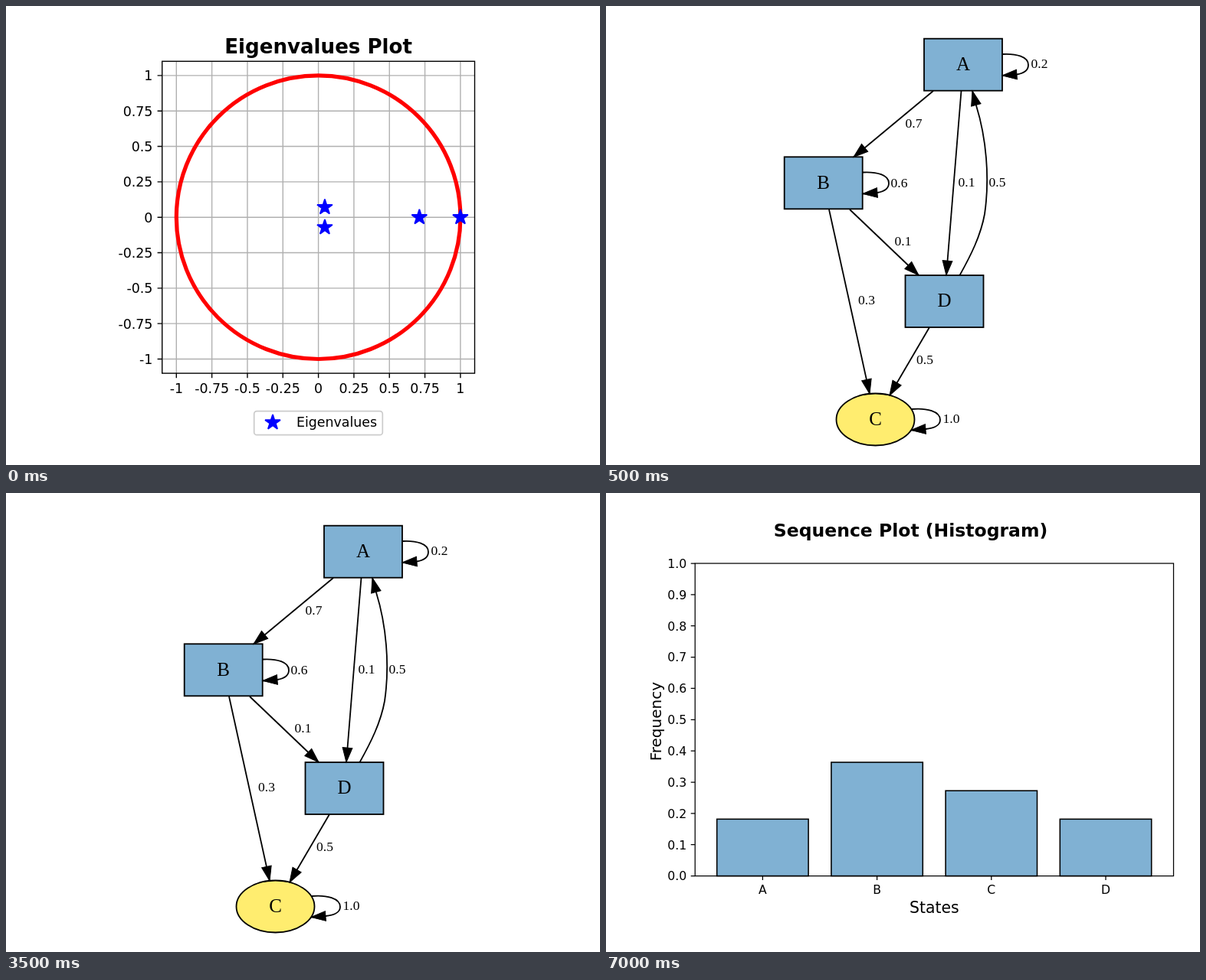
An HTML page that plays this animation: 775x600 px, repeating every 8000 ms.

```html
<!DOCTYPE html>
<html lang="en">
<head>
<meta charset="utf-8">
<title>Markov chain plots</title>
<style>
  html, body { margin: 0; width: 100%; height: 100%; overflow: hidden; background: #fff; }
  svg { display: block; }
  text { text-anchor: middle; }
  .plot { font-family: "DejaVu Sans", sans-serif; }
  .graph { font-family: "Liberation Serif", serif; font-size: 17.5px; }
  .graph .node { font-size: 25px; }
  .title { font-weight: bold; }
  .end { text-anchor: end; }
  .line { fill: none; stroke: #000; }
</style>
</head>
<body>
<svg id="stage" width="775" height="600" viewBox="0 0 775 600">
  <defs>
    <marker id="arrow" markerUnits="userSpaceOnUse" markerWidth="24" markerHeight="18"
            refX="20" refY="9" orient="auto">
      <path d="M1 2.6L20 9L1 15.4Z" stroke="#000"/>
    </marker>
  </defs>
</svg>
<script>
const BLUE = '#80b1d3', YELLOW = '#ffed6f';
const stage = document.getElementById('stage');

const text = (x, y, label, attrs = '') => `<text x="${x}" y="${y}" ${attrs}>${label}</text>`;
const path = (d, attrs = '') => `<path class="line" d="${d}" ${attrs}/>`;
const rect = (x, y, w, h, attrs) => `<rect x="${x}" y="${y}" width="${w}" height="${h}" ${attrs}/>`;
const range = n => [...Array(n).keys()];

function star(cx, cy) {
  const points = range(10).map(i => {
    const r = i % 2 ? 3.98 : 10.43, a = i * Math.PI / 5;
    return `${cx + r * Math.sin(a)},${cy - r * Math.cos(a)}`;
  });
  return `<polygon points="${points.join(' ')}" fill="#00f" stroke="#00f" stroke-width="1.74" stroke-linejoin="bevel"/>`;
}

function eigenvaluePlot() {
  const left = 203.7, top = 72.3, size = 407.8, bottom = top + size;
  const cx = left + size / 2, cy = top + size / 2, unit = 185.3;
  let grid = '', ticks = '', labels = '';
  for (let v = -1; v <= 1; v += 0.25) {
    const x = cx + v * unit, y = cy - v * unit;
    grid += `M${x} ${top}v${size}M${left} ${y}h${size}`;
    ticks += `M${x} ${bottom}v6.1M${left} ${y}h-6.1`;
    labels += text(x, 505.6, v) + text(191.4, y + 6.4, v, 'class="end"');
  }
  const values = [[0.045, 0.071], [0.045, -0.071], [0.711, 0], [1, 0]];
  return `<g class="plot" font-size="17.4">`
    + path(grid, 'style="stroke:#b0b0b0" stroke-width="1.39"')
    + `<circle cx="${cx}" cy="${cy}" r="${unit}" fill="none" stroke="red" stroke-width="5.2"/>`
    + values.map(([re, im]) => star(cx + re * unit, cy - im * unit)).join('')
    + path(ticks, 'stroke-width="1.39"')
    + rect(left, top, size, size, 'class="line" stroke-width="1.39"')
    + labels
    + text(cx, 61.5, 'Eigenvalues Plot', 'class="title" font-size="26.1"')
    + rect(323.7, 529.7, 167.6, 31, 'rx="3.5" fill="#fff" stroke="#ccc" stroke-width="1.74"')
    + star(348, 544.4)
    + text(431.5, 550.2, 'Eigenvalues')
    + '</g>';
}

function transitionGraph() {
  const boxes = [['A', 466, 76.7], ['B', 283.7, 231.3], ['D', 441.5, 386]];
  const edges = [
    ['M427 111L323 197.5', 0.7, 401.5, 158.5],
    ['M463.5 111L444 352', 0.1, 470.5, 236],
    ['M318 266L408 352', 0.1, 387.5, 312.5],
    ['M291 266L344 507', 0.3, 340, 390],
    ['M422 420L370 509', 0.5, 416, 468],
    ['M461.5 352C476 326 489 300 494 272C501 224 496 172 483 130L478 111', 0.5, 510.5, 236],
    ['M517 63C536 62 551 66.500 551 77C551 84 545 88 536 89.500L517 91', 0.2, 565.5, 80.5],
    ['M335 217.500C354 216.500 369 221 369 231.500C369 238.500 363 242.500 354 244L335 245.500', 0.6, 382.5, 236.5],
    ['M398 527C419 525 436 530 436 541C436 548 428 552 417 553L398 554.500', '1.0', 450.5, 545]
  ];
  const shape = 'stroke="#000" stroke-width="1.8"';
  return '<g class="graph">'
    + boxes.map(([name, x, y]) => rect(x - 51, y - 34, 102, 68, `fill="${BLUE}" ${shape}`)
        + text(x, y + 7.3, name, 'class="node"')).join('')
    + `<ellipse cx="351.5" cy="540.5" rx="51" ry="34" fill="${YELLOW}" ${shape}/>`
    + text(351.5, 547.5, 'C', 'class="node"')
    + edges.map(([d, p, x, y]) => path(d, 'stroke-width="1.8" marker-end="url(#arrow)"')
        + text(x, y, p)).join('')
    + '</g>';
}

function histogram() {
  const left = 116.2, top = 92, width = 624.3, height = 408.6, bottom = top + height;
  let ticks = '', labels = '', bars = '';
  for (const i of range(11)) {
    const y = bottom - i * height / 10;
    ticks += `M${left} ${y}h-5.5`;
    labels += text(105.2, y + 5.8, (i / 10).toFixed(1), 'class="end"');
  }
  [2, 4, 3, 2].forEach((count, i) => {
    const x = 204.4 + i * 149.2, h = height * count / 11;
    ticks += `M${x} ${bottom}v5.5`;
    labels += text(x, 523.6, 'ABCD'[i]);
    bars += rect(x - 59.7, bottom - h, 119.4, h, `fill="${BLUE}" stroke="#000" stroke-width="1.57"`);
  });
  return '<g class="plot" font-size="15.67">'
    + bars
    + path(ticks, 'stroke-width="1.25"')
    + rect(left, top, width, height, 'class="line" stroke-width="1.25"')
    + labels
    + text(397.5, 57.3, 'Sequence Plot (Histogram)', 'class="title" font-size="23.5"')
    + text(428.4, 549.2, 'States', 'font-size="20.4"')
    + text(0, 0, 'Frequency', 'font-size="20.0" transform="translate(71.8 298.7) rotate(-90)"')
    + '</g>';
}

stage.insertAdjacentHTML('beforeend', eigenvaluePlot() + transitionGraph() + histogram());
const slides = stage.querySelectorAll(':scope > g');
const start = performance.now();

function draw() {
  const t = (performance.now() - start) % 8000;
  const current = t < 500 ? 0 : t < 5500 ? 1 : 2;
  slides.forEach((slide, i) => { slide.style.display = i === current ? '' : 'none'; });
  requestAnimationFrame(draw);
}
draw();
</script>
</body>
</html>
```
